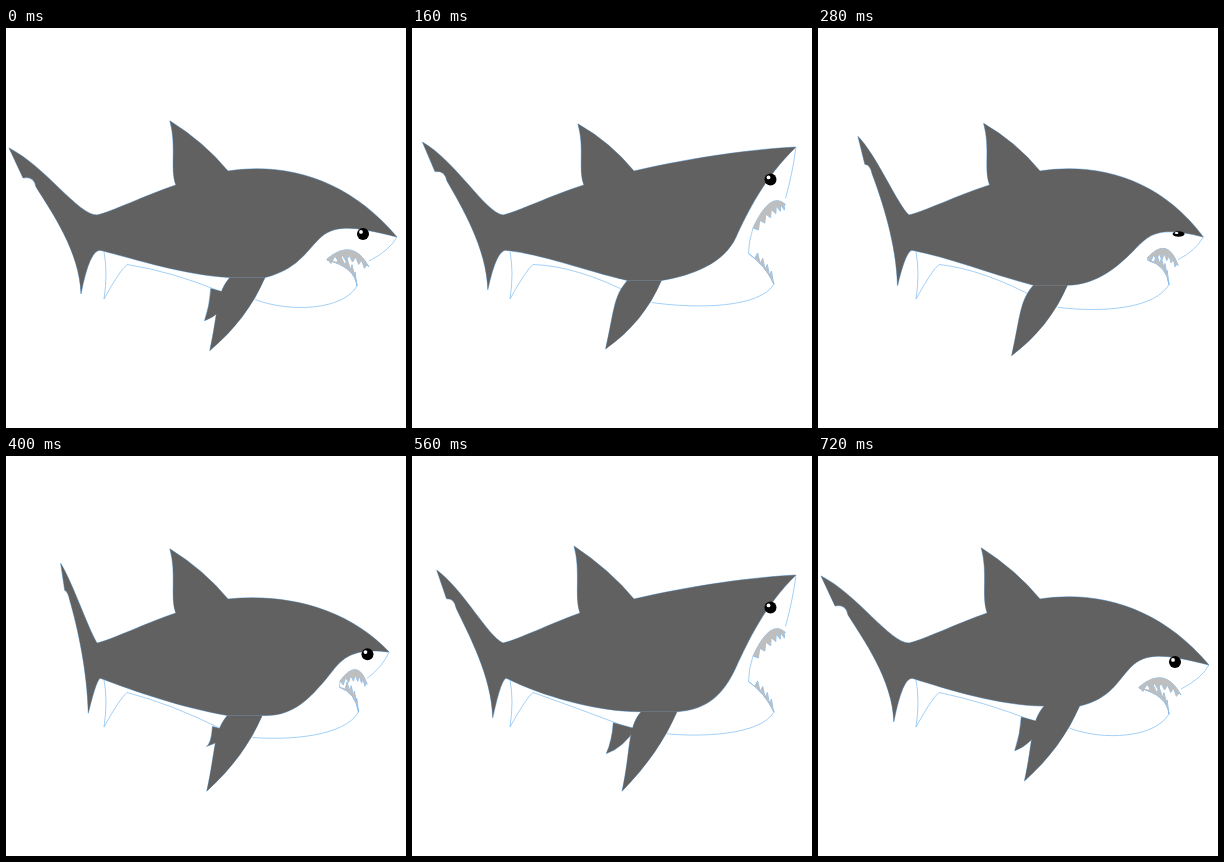
An HTML page with a canvas that plays this animation: 400x400 px, repeating every 760 ms.

```html
<!DOCTYPE html>
<html lang="en">
<head>
<meta charset="utf-8">
<title>Shark</title>
<style>
  html, body { margin: 0; width: 100%; height: 100%; overflow: hidden; background: #fff; }
  canvas { display: block; width: 400px; height: 400px; }
</style>
</head>
<body>
<canvas id="stage" width="400" height="400"></canvas>
<script>
const ctx = document.getElementById('stage').getContext('2d');
const GREY = '#616161', SILVER = '#bebebe', LINE = '#7dbcf3';
const LOOP = 760, STEP = 40;

const mix = (a, b, k) => a + (b - a) * k;
const blend = (p, q, k) => [mix(p[0], q[0], k), mix(p[1], q[1], k)];
const add = (p, x, y) => [p[0] + x, p[1] + y];

function ease(from, to, t) {
  const u = Math.min(1, Math.max(0, (t - from) / (to - from)));
  return u * u * (3 - 2 * u);
}
const pulse = (t, start, peak, end) => ease(start, peak, t) - ease(peak, end, t);
const wave = (t, peak) => Math.cos(2 * Math.PI * (t - peak) / LOOP);

// Every joint follows a few drivers: two bites, one tail sway, and slow waves.
function poseAt(t) {
  const open = pulse(t, 0, 160, 280) + pulse(t, 350, 560, 720);
  const sway = pulse(t, 90, 385, 700);
  const swing = wave(t, 600), sink = wave(t, 400), lift = wave(t, 740), lean = wave(t, 200);
  const finY = 254.5 + 5 * sink;
  const head = (closed, opened) => blend(closed, opened, open);
  return {
    open, sway,
    tailTop: [3 + 52 * sway, 113.5 + 6.5 * lift],
    tailLow: [78.5 + 4 * wave(t, 440), 261.5 + 4.5 * lift],
    dorsal: [164 + 2 * lean, 93 + 3 * lean],
    dorsalEnd: [170 + 2 * lean, 157],
    belly: [130, 233 + 7 * wave(t, 540)],
    finLeft: [222 + 7.5 * swing, finY],
    finRight: [257 + 8.5 * swing, finY],
    finTip: [201.5 + 9 * swing, 328.5 + 8.5 * wave(t, 480)],
    farTop: [206 - 5 * swing, finY + 11],
    farTip: [200 - 6 * swing, 291 + 7 * swing],
    nose: head([391 - 8 * sway, 209], [384, 119]),
    cheek: head([313 + 5 * sway, 211 + 15 * sway], [324, 208 + 8 * sway]),
    eye: head([357 + 5 * sway, 206], [358.5, 151.5]),
    blink: pulse(t, 200, 285, 390),
    gumBack: head([321 + 12 * sway, 231 - 2 * sway], [341, 200]),
    gumFront: head([363 - 4 * sway, 239 - 2 * sway], [373.5, 176.5]),
    corner: head([321 + 12 * sway, 232], [336.5, 225.5]),
    jaw: head([351, 258 - 2 * sway], [362, 256])
  };
}

// Path from a start point and segments of 1 (line), 2 (quadratic) or 3 (cubic) points.
function path(start, ...segments) {
  const p = new Path2D();
  p.moveTo(...start);
  for (const s of segments) {
    const method = ['lineTo', 'quadraticCurveTo', 'bezierCurveTo'][s.length - 1];
    p[method](...s.flat());
  }
  return p;
}

function hairline(p, width = 0.7) {
  ctx.strokeStyle = LINE;
  ctx.lineWidth = width;
  ctx.stroke(p);
}

// Outlines go below all fills, so joined shapes show no seam.
function solid(color, ...shapes) {
  shapes.forEach(p => hairline(p, 0.9));
  ctx.fillStyle = color;
  shapes.forEach(p => ctx.fill(p));
}

// Zigzag along a quadratic curve, every second point pushed out to a tooth tip.
function teeth(a, b, c, from, to, count, dx, dy) {
  return Array.from({ length: count * 2 + 1 }, (_, i) => {
    const t = mix(from, to, i / (count * 2));
    const p = blend(blend(a, b, t), blend(b, c, t), t);
    return [i % 2 ? add(p, dx, dy) : p];
  });
}

function drawBelly({ open, belly, farTop, jaw, finRight }) {
  hairline(path([98, 224], [[102, 245], [98, 271]], [[114, 242], [121, 236.5]],
    [[165, belly[1] + 12], add(farTop, 10, 3)]));
  hairline(path(jaw, [add(jaw, -14, 24), [285, mix(285, 281, open)], add(finRight, -10, 22)]));
}

function farFin({ farTop, farTip }) {
  return path(farTop, [add(farTop, -1, 17), farTip],
    [add(farTip, 17, -6), add(farTop, 22, 6)], [farTop]);
}

function nearFin({ finLeft, finRight, finTip }) {
  return path(finRight, [add(finRight, -18, 42), finTip],
    [add(finTip, 9, -40), add(finLeft, -14, 16), finLeft]);
}

function body({ open, sway, tailTop, tailLow, dorsal, dorsalEnd, belly, finLeft, finRight, cheek, nose }) {
  const flat = open * (1 - open);
  const notch = add(tailTop, 27 - 18 * sway, 39 - 2 * sway);
  const tx = mix(14, 12, open), ty = mix(-14, -26, open);
  return path([91, 187],
    [[105, 184], [140, 167], dorsalEnd],
    [add(dorsalEnd, -6, -16), add(dorsal, 7, 25), dorsal],
    [[198, 114], [222, 143]],
    [[282, mix(134, 129, open) + 30 * flat], [343, mix(152, 121, open) + 45 * flat], nose],
    [add(nose, mix(-47, -31, open), mix(-12, 30, open)), add(cheek, tx, ty), cheek],
    [add(cheek, -tx, -ty), add(finRight, 32, finRight[1] - 258), finRight],
    [finLeft],
    [[finLeft[0] - 45, belly[1] + 16], belly, [95, 222.5]],
    [[tailLow[0] + 9, 220], tailLow],
    [add(tailLow, -1, -42), add(notch, 15 - 7 * sway, 24 + 4 * sway), notch],
    [add(tailTop, 25 - 18 * sway, 28), add(tailTop, 14 - 10 * sway, 30 - 3 * sway)],
    [tailTop],
    [add(tailTop, 37 - 25 * sway, 19 + sway), [72 + 10 * sway, 187 - 15 * sway], [91, 187]]);
}

function drawMouth({ open, nose, gumBack, gumFront, corner, jaw }) {
  const arch = add(blend(gumBack, gumFront, 0.5), mix(5, 1, open), -26);
  const inner = add(arch, mix(0, 5, open), 11);
  const lip = add(jaw, mix(-2, -9, open), -19);
  const rim = add(lip, 0, mix(-5, 0, open));

  hairline(path(nose, [add(nose, mix(-8, -3, open), mix(14, 24, open)), add(gumFront, 0, -6)]));
  hairline(path(gumBack, [add(corner, 0, -12 * open), corner], [lip, jaw]));
  solid(SILVER,
    path(gumBack, [arch, gumFront],
      ...teeth(gumFront, inner, gumBack, 0.06, 1, 6, 2 * open, 6)),
    path(corner, [lip, jaw],
      ...teeth(jaw, rim, corner, 0.04, 0.8, 4, open - 1, -8)));
}

function ellipse(x, y, rx, ry, color) {
  ctx.fillStyle = color;
  ctx.beginPath();
  ctx.ellipse(x, y, rx, ry, 0, 0, Math.PI * 2);
  ctx.fill();
}

function drawEye({ eye: [x, y], blink }) {
  const ry = mix(6, 2.8, blink);
  ellipse(x, y, 6, ry, '#000');
  ellipse(x - 2, y - ry * 0.35, 1.9, ry * 0.32, '#fff');
}

function draw(t) {
  const pose = poseAt(t);
  ctx.fillStyle = '#fff';
  ctx.fillRect(0, 0, 400, 400);
  drawBelly(pose);
  solid(GREY, body(pose), farFin(pose), nearFin(pose));
  drawMouth(pose);
  drawEye(pose);
}

const start = performance.now();
function tick() {
  const t = (performance.now() - start) % LOOP;
  draw(Math.floor(t / STEP) * STEP);
  requestAnimationFrame(tick);
}
tick();
</script>
</body>
</html>
```
